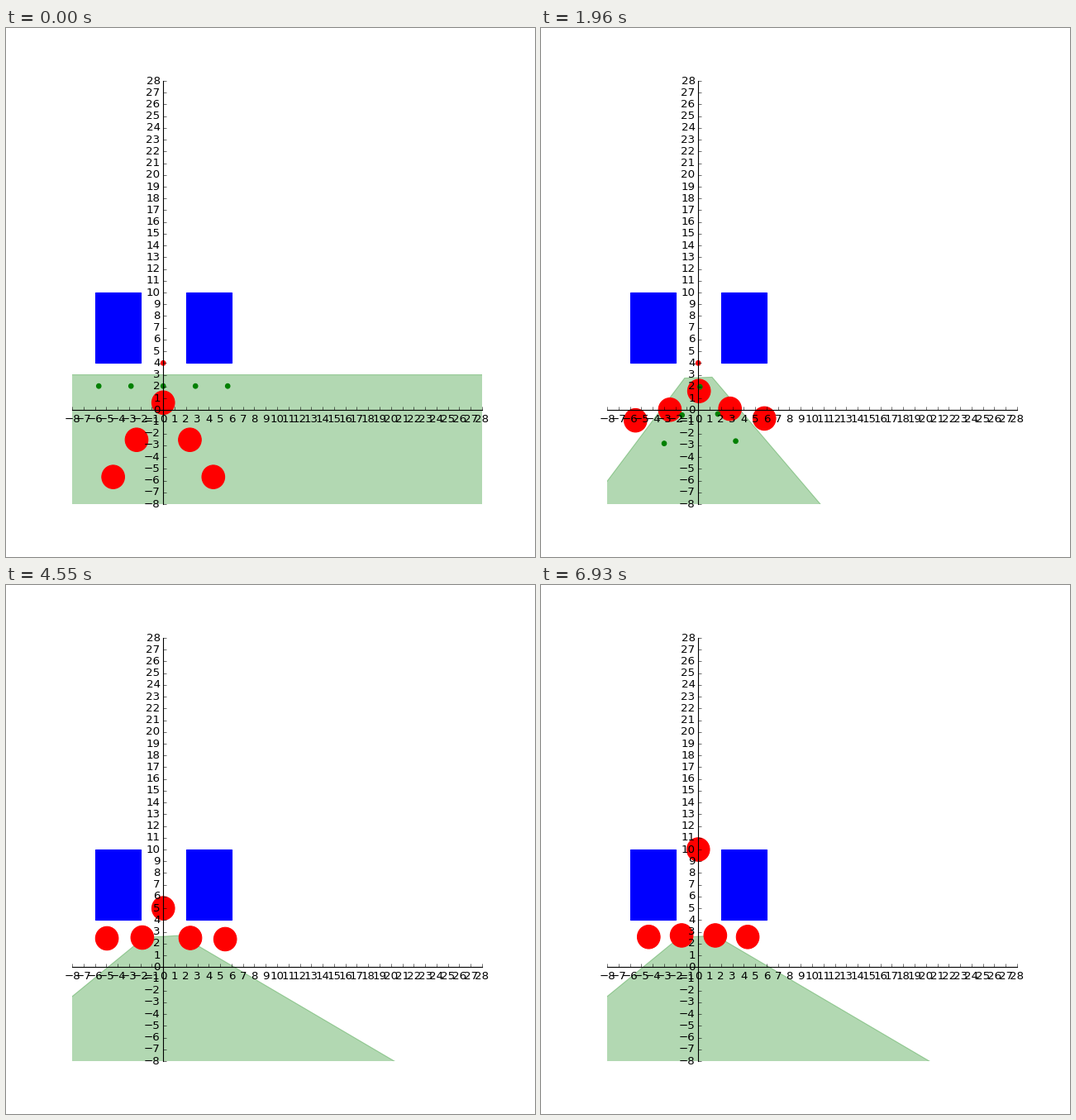
Recreate the animation shown at these times as a matplotlib script. Size 640 by 640 pixels, loop 7000 ms.

```python
import math

import numpy as np
import matplotlib.pyplot as plt
from matplotlib.animation import FuncAnimation
from matplotlib.patches import Circle, Polygon, Rectangle

FRAMES, INTERVAL = 100, 70
LOW, HIGH = -8, 28
RANKS = range(-2, 3)
CLIMB, SETTLE, EXIT = 38, 53, 78

plt.rcParams.update({
    "font.family": "DejaVu Sans", "font.size": 12, "savefig.dpi": "figure",
    "axes.linewidth": 1.0, "axes.axisbelow": False, "patch.linewidth": 1.0,
    "ytick.alignment": "center",
})


def place(rank, cx, cy, step, grow=1, tilt=0, fall=0, power=1):
    """Spot of one team member, counted outward from the middle."""
    n = abs(rank)
    x = cx + math.copysign(step * n ** grow, rank)
    return x, cy + tilt * rank - fall * n ** power


def team(**shape):
    return [place(rank, **shape) for rank in RANKS]


def roof(left, right, slopes, floor=-20):
    """Free region below a ridge, with sides running down out of view."""
    (xl, yl), (xr, yr) = left, right
    return [(xl - (yl - floor) / slopes[0], floor), left, right,
            (xr + (yr - floor) / slopes[1], floor)]


REGIONS = {
    0: roof((-20, 3), (40, 3), (1, 1)),
    10: roof((0, 3.56), (0, 3.56), (0.545, 0.545)),
    20: roof((0, 4), (0, 4), (0.8, 0.8)),
    25: roof((-1.2, 2.72), (1.22, 2.8), (1.29, 1.136)),
    30: roof((0, 4.1), (0, 4.1), (0.52, 0.52)),
    35: roof((-1.32, 2.55), (1.29, 2.72), (1.305, 1.07)),
    40: roof((-1.68, 2.51), (1.51, 2.69), (0.793, 0.569)),
}
GOALS = {
    0: team(cx=0, cy=2.04, step=2.83),
    10: team(cx=0.1, cy=0.53, step=2.83, tilt=-0.033),
    20: team(cx=0.15, cy=1.98, step=1.57, tilt=0.05, fall=2.36),
    30: team(cx=1.39, cy=-0.19, step=2.41, tilt=-1.487),
    40: None,
}
TARGETS = {0: (0, 4), 40: (0, 5), EXIT + 1: (0, 10)}

# Key poses of the team: cx, cy, step, grow, tilt, fall, power
POSES = {
    0: (0, 0.63, 2.34, 0.91, 0, 3.16, 1),
    16: (0.02, 1.78, 2.68, 1.05, 0.02, 1.63, 1.23),
    28: (0.15, 1.62, 2.64, 1.1, 0.04, 1.55, 0.64),
    CLIMB: (0.22, 0.73, 2.84, 1.06, -0.82, 0.42, 1.85),
    SETTLE: (0.57, 4.8, 2.7, 1.145, -0.05, 2.71, 0),
}
PATHS = {rank: np.array([place(rank, *pose) for pose in POSES.values()])
         for rank in RANKS}


def smooth(t, keys, values):
    """Cubic through the keys that never overshoots them."""
    keys, values = np.asarray(keys, float), np.asarray(values, float)
    h = np.diff(keys)
    d = np.diff(values) / h
    m = np.concatenate([d[:1], np.zeros(len(d) - 1), d[-1:]])
    for i in range(1, len(d)):
        if d[i - 1] * d[i] > 0:
            m[i] = 2 * d[i - 1] * d[i] / (d[i - 1] + d[i])
    i = int(np.clip(np.searchsorted(keys, t, "right") - 1, 0, len(h) - 1))
    s = (t - keys[i]) / h[i]
    return ((1 + 2 * s) * (1 - s) ** 2 * values[i] + s * (1 - s) ** 2 * h[i] * m[i]
            + s * s * (3 - 2 * s) * values[i + 1] + s * s * (s - 1) * h[i] * m[i + 1])


def rise(t, start, length, low, high):
    u = np.clip((t - start) / length, 0, 1)
    return low + (high - low) * (1 - (1 - u) ** 1.4)


def leader_at(t):
    x = 0.24 * math.exp(-((t - CLIMB) / 9) ** 2)
    if t < CLIMB:
        return x, smooth(t, list(POSES)[:4], PATHS[0][:4, 1])
    if t < EXIT:
        return x, rise(t, CLIMB, 17, POSES[CLIMB][1], 5)
    return x, rise(t, EXIT, 20, 5, 10)


def follower_at(t, rank):
    path = PATHS[rank]
    if t < SETTLE:
        return tuple(smooth(t, list(POSES), path[:, axis]) for axis in (0, 1))
    side, outer = math.copysign(1, rank), abs(rank) - 1
    rest = np.array([side * (1.3 + 2.8 * outer), 2.7 - 0.13 * outer])
    rates = np.array([0.043 + 0.007 * side, 0.09])
    return tuple(rest + (path[-1] - rest) * np.exp(-rates * (t - SETTLE)))


def current(stages, t):
    return stages[max(start for start in stages if start <= t)]


fig = plt.figure(figsize=(8, 8), dpi=80, facecolor="white")
ax = fig.add_axes([0.125, 0.1, 0.775, 0.8])
ax.set(xlim=(LOW, HIGH), ylim=(LOW, HIGH))
ax.set_xticks(range(LOW, HIGH + 1))
ax.set_yticks(range(LOW, HIGH + 1))
ax.tick_params(direction="in", length=4, width=0.5, labelsize=12)
ax.tick_params(axis="x", pad=4.6)
ax.tick_params(axis="y", pad=3.25)
for side in ("left", "bottom"):
    ax.spines[side].set_position("zero")
for side in ("right", "top"):
    ax.spines[side].set_visible(False)

region = ax.add_patch(Polygon(REGIONS[0], color="g", alpha=0.3, snap=False))
for x in (-6, 2):
    ax.add_patch(Rectangle((x, 4), 4, 6, color="b"))


def disc(radius, color):
    return ax.add_patch(Circle((0, 0), radius, color=color))


robots = {rank: disc(1, "r") for rank in RANKS}
goals = [disc(0.2, "g") for _ in RANKS]
target = disc(0.2, "r")


def update(t):
    region.set_xy(current(REGIONS, t))
    target.center = current(TARGETS, t)
    spots = current(GOALS, t)
    for i, dot in enumerate(goals):
        dot.set_visible(spots is not None)
        if spots:
            dot.center = spots[i]
    for rank, robot in robots.items():
        robot.center = follower_at(t, rank) if rank else leader_at(t)
    return [region, *robots.values(), *goals, target]


anim = FuncAnimation(fig, update, frames=FRAMES, interval=INTERVAL,
                     repeat=True, repeat_delay=0, blit=False)
plt.show()
```
